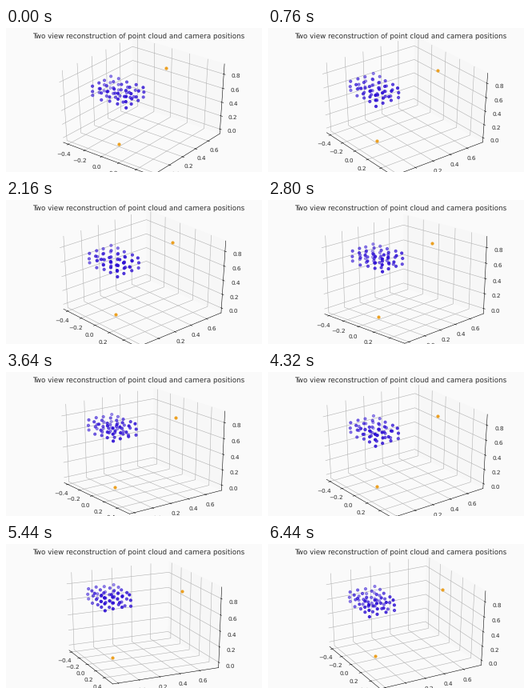
Animation, 320 px wide and 180 px high, one loop 6.48 s. Source, as a matplotlib script:

```python
import itertools

import matplotlib.pyplot as plt
import numpy as np
from matplotlib.animation import FuncAnimation

W, H, DPI = 320, 180, 50
FRAMES, STEP = 162, 40
PAPER, INK, BLUE, ORANGE = "#fafafa", "#2c2c2c", "#2e10d4", "#eca022"

plt.rcParams.update({
    "font.family": "DejaVu Sans",
    "font.size": 10.4,
    "text.hinting": "none",
    "axes.linewidth": 0.8,
    "grid.linewidth": 0.8,
})

# Turning points of the drag: (seconds, degrees)
ELEV = [(0.2, 35), (1.4, 38), (3.4, 21.8), (4.32, 30.5), (5.05, 20.5), (6.44, 31)]
AZIM = [(0.2, -52), (1.33, -22.5), (2.5, -46.5), (4.05, -34.5), (4.75, -42),
        (5.5, -24.5), (6.44, -28.5)]


def swing(turns, t):
    """Ease in and out between successive turning points."""
    times, angles = np.transpose(turns)
    place = np.interp(t, times, np.arange(len(times)))
    i = int(place)
    ease = (1 - np.cos(np.pi * (place - i))) / 2
    return np.interp(i + ease, np.arange(len(angles)), angles)


def cloud():
    """Slightly noisy box of points."""
    centre, half, counts = (0.036, -0.04, 0.76), (0.185, 0.12, 0.074), (5, 4, 3)
    axes = [c + np.linspace(-h, h, n) for c, h, n in zip(centre, half, counts)]
    points = np.array(list(itertools.product(*axes)))
    return (points + np.random.default_rng(4).normal(0, 0.007, points.shape)).T


fig = plt.figure(figsize=(W / DPI, H / DPI), dpi=DPI, facecolor=PAPER)
box_w, box_h, left, top = 254.6, 189.6, 39.4, 2.8
ax = fig.add_axes(
    [left / W, 1 - (top + box_h) / H, box_w / W, box_h / H], projection="3d")
ax.set_facecolor("none")

# Let the projection stretch to the whole axes rectangle
ax.apply_aspect = lambda position=None: None
ax.set_box_aspect((1, 1, 1), zoom=0.947)

dots = dict(s=20, linewidths=1.5)
ax.scatter(*cloud(), c=BLUE, **dots)
ax.scatter([0, 0], [0, 0.7], [-0.03, 0.71], c=ORANGE, depthshade=False, **dots)

ax.set(xlim=(-0.46, 0.58), ylim=(-0.25, 0.79), zlim=(-0.07, 0.94),
       xticks=np.arange(-2, 3) / 5, yticks=np.arange(-1, 4) / 5,
       zticks=np.arange(5) / 5)
ax.tick_params(labelcolor=INK)
ax.tick_params(axis="z", pad=4.5)
for axis, shade in zip((ax.xaxis, ax.yaxis, ax.zaxis), (PAPER, "#f7f7f7", PAPER)):
    axis.set_pane_color(shade)

fig.text(165.5 / W, 1 - 13.6 / H,
         "Two view reconstruction of point cloud and camera positions",
         size=12.7, ha="center", va="baseline", color=INK)


def draw(frame):
    t = frame * STEP / 1000
    ax.view_init(elev=swing(ELEV, t), azim=swing(AZIM, t))
    return []


anim = FuncAnimation(fig, draw, frames=FRAMES, interval=STEP,
                     init_func=lambda: draw(0), repeat=True, repeat_delay=0)
plt.show()
```
